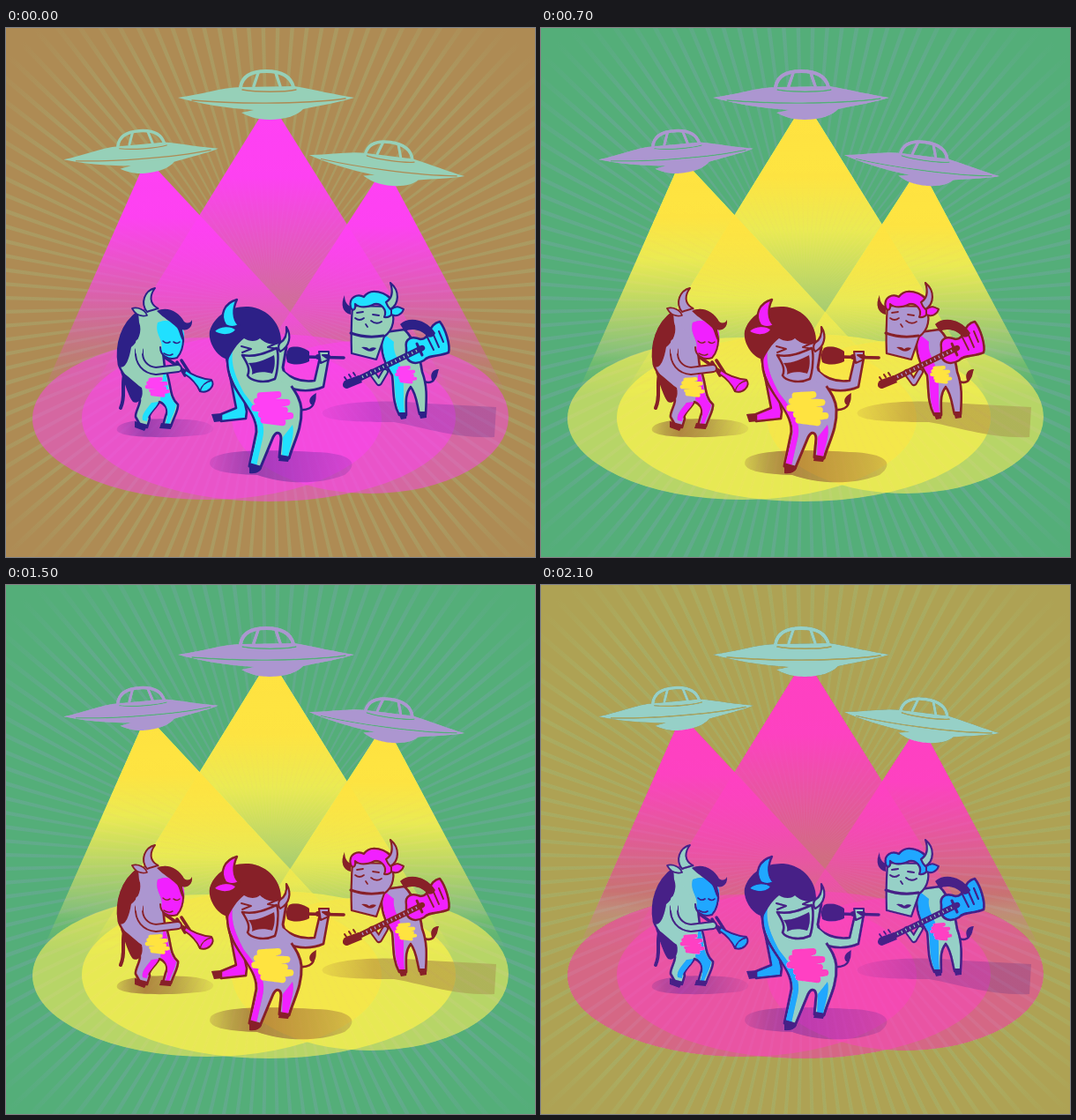
Recreate the animation shown at these times as an HTML page with a canvas. Size 600 by 600 pixels, loop 2200 ms.

```html
<!DOCTYPE html>
<html lang="en">
<head>
<meta charset="utf-8">
<title>Cow band under saucers</title>
<style>
html, body { margin: 0; width: 100%; height: 100%; overflow: hidden; background: #ae8b54; }
canvas { display: block; width: 100vw; height: 100vh; }
</style>
</head>
<body>
<canvas id="stage" width="600" height="600"></canvas>
<script>
const SIZE = 600, FRAME = 100, COUNT = 22, HUE_STEP = 15.4;
const BG = '#ae8b54', DARK = '#2d2087', CYAN = '#20e0ff', MINT = '#96d0b8', PINK = '#ff40f4';
const beam = a => `rgba(255,64,244,${a})`;
const shade = a => `rgba(45,32,135,${a})`;
const ray = a => `rgba(170,157,100,${a})`;

const view = document.getElementById('stage').getContext('2d');
const art = document.createElement('canvas');
art.width = art.height = SIZE;
const g = art.getContext('2d', { willReadFrequently: true });
g.lineJoin = g.lineCap = 'round';

function fill(color, d) {
  g.fillStyle = color;
  g.fill(new Path2D(d));
}
function line(color, width, d) {
  g.strokeStyle = color;
  g.lineWidth = width;
  g.stroke(new Path2D(d));
}
function shape(color, d, width = 2.6) {
  fill(color, d);
  line(DARK, width, d);
}
function limb(color, width, d) {
  line(DARK, width + 4, d);
  line(color, width, d);
}
function oval(paint, x, y, rx, ry) {
  g.fillStyle = paint;
  g.beginPath();
  g.ellipse(x, y, rx, ry, 0, 0, 7);
  g.fill();
}

function rays() {
  const cx = 300, cy = 314, reach = 410, n = 120, half = Math.PI / n * 0.27;
  const fade = g.createRadialGradient(cx, cy, 0, cx, cy, reach);
  fade.addColorStop(0, ray(0.85));
  fade.addColorStop(0.75, ray(0.85));
  fade.addColorStop(1, ray(0));
  g.fillStyle = fade;
  g.beginPath();
  for (let i = 0; i < n; i++) {
    const a = (i + 0.5) / n * Math.PI * 2;
    g.moveTo(cx, cy);
    g.lineTo(cx + reach * Math.cos(a - half), cy + reach * Math.sin(a - half));
    g.lineTo(cx + reach * Math.cos(a + half), cy + reach * Math.sin(a + half));
  }
  g.fill();
}

function cone(x1, x2, top, left, right, bottom) {
  const fade = g.createLinearGradient(0, top, 0, bottom);
  fade.addColorStop(0, beam(1));
  fade.addColorStop(0.22, beam(0.98));
  fade.addColorStop(0.6, beam(0.5));
  fade.addColorStop(1, beam(0));
  fill(fade, `M${x1} ${top}L${x2} ${top}L${right} ${bottom}L${left} ${bottom}Z`);
}

function shadow(x1, x2, a, b, d) {
  const fade = g.createLinearGradient(x1, 0, x2, 0);
  fade.addColorStop(0, shade(a * 0.3));
  fade.addColorStop(0.3, shade(a));
  fade.addColorStop(1, shade(b));
  fill(fade, d);
}

function saucer(x, y, scale, angle) {
  g.save();
  g.translate(x, y);
  g.rotate(angle * Math.PI / 180);
  g.scale(scale, scale);
  fill(MINT, 'M-100 0C-75-3-50-12-28-12L32-13C55-9 80-3 100 0C85 5 60 9 42 13C36 20 22 25 4 25C-12 25-20 21-28 17L-14 14C-45 12-75 7-100 0Z');
  line(BG, 1.4, 'M-84 3C-40 7 40 8 90 1');
  line(BG, 1.4, 'M-27-9C-10-6 20-6 34-9');
  line(MINT, 4, 'M-29-12C-27-24-18-30 0-30C18-30 28-24 31-12');
  line(MINT, 3.4, 'M-14-13L-9-28M16-13L11-28');
  g.restore();
}

function scribble(x, y, s) {
  g.save();
  g.translate(x, y);
  g.scale(s, s);
  line(PINK, 6, 'M-10-11L6-12L-13-6L14-5L-15 0L12 2L-9 6L17 7L-7 11L10 13');
  g.restore();
}

function trumpeter() {
  line(DARK, 4, 'M134 394C131 408 136 418 130 431');
  shape(MINT, 'M150 322C132 335 124 358 128 382C132 396 146 405 150 416C156 424 146 434 147 441L152 450L160 453L163 443C160 438 170 432 174 424C180 426 185 432 181 440L178 451L187 452C190 442 196 433 195 427C184 418 188 400 180 385L176 350L172 318Z');
  fill(CYAN, 'M179 386C185 400 182 416 193 427C192 434 188 442 185 449L181 449C184 438 186 430 175 422Z');
  fill(CYAN, 'M165 425L173 424C170 432 160 438 160 446L155 445C153 438 160 432 165 425Z');
  fill(DARK, 'M150 322C132 335 124 360 128 384C136 388 140 374 142 362C150 356 155 344 151 334Z');
  fill(DARK, 'M130 390C138 393 145 402 154 408C157 420 150 427 144 424C139 418 135 404 130 390Z');
  fill(DARK, 'M146 446L161 450L157 457L146 453ZM176 448L188 449L187 455L174 454Z');
  fill(MINT, 'M154 322C165 316 180 318 195 330C204 340 204 358 198 370C190 376 180 376 176 368C172 352 158 342 154 322Z');
  fill(CYAN, 'M172 334C185 328 200 336 202 346C203 358 200 370 194 374C184 377 178 374 176 366C180 354 168 348 172 334Z');
  line(DARK, 2, 'M175 362C175 372 184 377 194 374C199 369 201 360 201 354');
  fill(DARK, 'M171 321C182 315 196 321 202 333C206 336 210 334 211 331C212 340 205 344 200 342C200 346 203 350 202 357C197 351 197 344 194 340C186 332 180 330 171 321Z');
  shape(MINT, 'M169 295C157 298 152 312 160 322C164 320 168 320 172 318C162 312 163 303 169 295Z', 2);
  shape(MINT, 'M143 318C150 316 158 320 160 326C152 328 146 324 143 318Z', 1.8);
  line(DARK, 1.6, 'M178 355q4 4 8 1M190 356q4 3 7 0M179 369q6 4 10 1');
  line(DARK, 3.5, 'M181 374L208 393M194 379L203 394M199 377L208 391');
  shape(CYAN, 'M204 388C214 396 224 398 233 399C238 406 229 415 220 412C216 403 210 397 202 392Z', 2);
  line(DARK, 1.5, 'M233 400Q223 402 220 412');
  limb(MINT, 6, 'M151 366C150 379 158 388 170 389L195 386');
  line(MINT, 8, 'M151 357L151 367');
  scribble(171, 407, 0.74);
}

function singer() {
  line(DARK, 2.5, 'M332 433C341 434 350 431 349 422');
  fill(DARK, 'M352 414C342 419 343 426 348 428C353 423 351 418 352 414Z');
  shape(CYAN, 'M250 374L261 431L244 438L244 446L272 443L273 435L262 384Z');
  fill(DARK, 'M233 438L244 437L245 446L236 447Z');
  shape(MINT, 'M314 389C324 398 336 402 350 400L356 374L366 374L360 407C346 413 330 412 316 406Z');
  shape(MINT, 'M262 352C248 364 250 387 256 400C264 420 285 436 284 458L276 497L288 500L303 464C307 456 312 459 312 466L310 487L321 488C326 470 336 455 335 432C333 412 318 405 314 385L318 362C300 345 275 345 262 352Z', 3);
  line(MINT, 10, 'M312 394L321 402');
  fill(CYAN, 'M258 360C253 382 262 398 270 414C286 434 296 448 291 466L284 497L277 496L286 459C286 437 266 421 258 400C251 386 250 370 258 360Z');
  fill(CYAN, 'M314 464L325 450C328 460 322 476 320 486L313 486Z');
  fill(DARK, 'M276 493L290 497C290 503 284 506 276 505ZM311 484L322 486L320 492L309 491Z');
  fill(DARK, 'M270 352C262 358 256 368 252 376C238 373 229 355 231 344C236 326 255 315 275 316C298 318 313 337 312 357C304 361 294 358 288 352C284 356 276 356 270 352Z');
  shape(CYAN, 'M262 308C247 312 242 326 249 337C254 340 259 340 264 337C257 330 257 318 262 308Z', 2.4);
  shape(CYAN, 'M236 344C243 337 255 337 261 342C257 349 244 350 236 344Z', 1.6);
  shape(MINT, 'M318 339C324 349 322 361 311 367C308 364 309 359 311 357C316 354 319 348 318 339Z', 2.2);
  line(DARK, 2, 'M267 361L278 364L268 368M308 357L297 362L308 364');
  shape(MINT, 'M268 371C282 374 296 368 307 363C310 370 308 390 305 398C292 404 277 400 274 394C278 386 272 378 268 371Z', 2.6);
  fill(DARK, 'M275 380C286 380 297 375 304 371C306 380 304 388 302 392C293 389 284 390 279 393C280 388 278 384 275 380Z');
  line(DARK, 3.6, 'M340 373L383 374');
  line(DARK, 6, 'M354 373L365 373');
  fill(DARK, 'M321 363C327 360 338 362 344 367L344 378C337 382 326 383 319 379Q316 370 321 363Z');
  shape(MINT, 'M355 367L366 367L366 371L359 371L366 376L357 380Z', 2);
  scribble(301, 431, 1.26);
}

function guitarist() {
  line(DARK, 2.4, 'M470 398C480 406 489 400 485 393');
  fill(DARK, 'M491 387C483 387 480 394 484 401C490 397 489 392 491 387Z');
  shape(MINT, 'M430 345C422 360 428 378 438 394C440 410 438 424 446 439L454 439C454 426 452 416 459 407C466 416 466 428 469 438L476 438C477 420 478 406 472 390C470 374 464 354 452 342Z');
  fill(CYAN, 'M430 348C424 362 430 380 440 394C442 410 440 424 447 437L452 437C450 420 452 408 450 394C448 378 438 370 440 356Z');
  fill(DARK, 'M445 436L455 436L454 443L448 444ZM468 435L477 435L477 442L470 443Z');
  shape(CYAN, 'M454 363C452 352 460 349 470 353C482 353 478 336 492 333C499 342 504 360 502 368C492 373 480 370 474 377C464 383 455 379 454 371Z');
  line(DARK, 2, 'M477 349L485 365M484 346L491 362M491 344L496 356');
  line(DARK, 3, 'M466 358L472 371');
  fill(DARK, 'M447 336C456 327 476 329 487 346C485 352 478 352 476 348C470 342 460 340 452 344Z');
  limb(MINT, 4, 'M415 391L423 402L430 390');
  line(DARK, 6.4, 'M472 363L398 399');
  g.setLineDash([1.2, 4]);
  g.lineCap = 'butt';
  line(MINT, 3, 'M466 366L402 397');
  g.setLineDash([]);
  g.lineCap = 'round';
  fill(DARK, 'M400 394L386 399C380 402 381 409 387 409L404 402Z');
  line(DARK, 2, 'M386 399L384 396M391 396L389 393M396 394L394 391');
  shape(MINT, 'M393 315C392 330 391 340 392 369L420 376L429 350C440 342 442 328 436 316Z', 2.2);
  line(DARK, 3, 'M391 346C402 350 416 351 428 349');
  line(DARK, 1.8, 'M396 329q5 4 10 0M414 332q6 5 12 1M398 323l7-1M416 325l7 1M408 336l2 3');
  fill(DARK, 'M403 362Q409 361 412 364Q415 361 420 363Q414 371 403 362Z');
  shape(CYAN, 'M391 317C388 305 399 301 406 305C413 294 432 299 439 311C443 321 437 329 429 328C433 319 425 312 418 313C410 317 402 318 396 313C397 318 394 323 391 317Z', 2.2);
  fill(DARK, 'M384 303C379 314 382 323 391 325L391 316C386 314 384 309 384 303Z');
  shape(MINT, 'M436 289C447 298 446 313 436 319C434 317 432 314 431 311C439 306 439 298 436 289Z', 2.2);
  shape(CYAN, 'M437 319C443 314 447 317 451 319C449 325 443 328 437 325Z', 2);
  scribble(453, 393, 0.66);
}

function scene() {
  g.fillStyle = BG;
  g.fillRect(0, 0, SIZE, SIZE);
  rays();
  cone(290, 309, 98, 91, 510, 420);
  cone(155, 169, 158, 41, 409, 415);
  cone(421, 437, 170, 262, 568, 415);
  oval(beam(0.48), 228, 443, 198, 92);
  oval(beam(0.48), 298, 442, 212, 95);
  oval(beam(0.48), 413, 441, 157, 87);
  shadow(124, 238, 0.4, 0.04, 'M126 454C130 444 170 442 205 444C236 446 244 456 226 461C190 466 120 466 126 454Z');
  shadow(232, 396, 0.4, 0.14, 'M232 490C240 478 300 478 350 481C392 482 402 494 384 507C350 520 310 516 285 507C250 506 226 502 232 490Z');
  shadow(360, 556, 0.2, 0.2, 'M360 434C380 422 440 422 480 426L556 430L554 464C510 466 470 452 440 447C400 447 350 446 360 434Z');
  saucer(295, 79, 1, 0);
  saucer(153, 143, 0.88, -4);
  saucer(432, 156, 0.89, 7.8);
  trumpeter();
  guitarist();
  singer();
}

// Turns the hue of every pixel while keeping its lightness and saturation.
function turnHue(base, degrees) {
  const out = new ImageData(SIZE, SIZE), src = base.data, dst = out.data;
  for (let i = 0; i < src.length; i += 4) {
    const r = src[i], gr = src[i + 1], b = src[i + 2];
    const max = Math.max(r, gr, b), c = max - Math.min(r, gr, b);
    let h = 0;
    if (c) h = max === r ? (gr - b) / c + 6 : max === gr ? (b - r) / c + 2 : (r - gr) / c + 4;
    h += degrees / 60;
    for (let j = 0; j < 3; j++) {
      const k = (5 - 2 * j + h) % 6;
      dst[i + j] = max - c * Math.max(0, Math.min(k, 4 - k, 1));
    }
    dst[i + 3] = 255;
  }
  return out;
}

scene();
const base = g.getImageData(0, 0, SIZE, SIZE);
const tints = [base];
let shown = -1;

function draw(now) {
  const i = Math.floor(now / FRAME) % COUNT;
  const k = Math.min(i, COUNT - i);
  if (k !== shown) {
    tints[k] = tints[k] || turnHue(base, k * HUE_STEP);
    view.putImageData(tints[k], 0, 0);
    shown = k;
  }
}

const start = performance.now();
function tick() {
  draw(performance.now() - start);
  requestAnimationFrame(tick);
}
tick();
</script>
</body>
</html>
```
